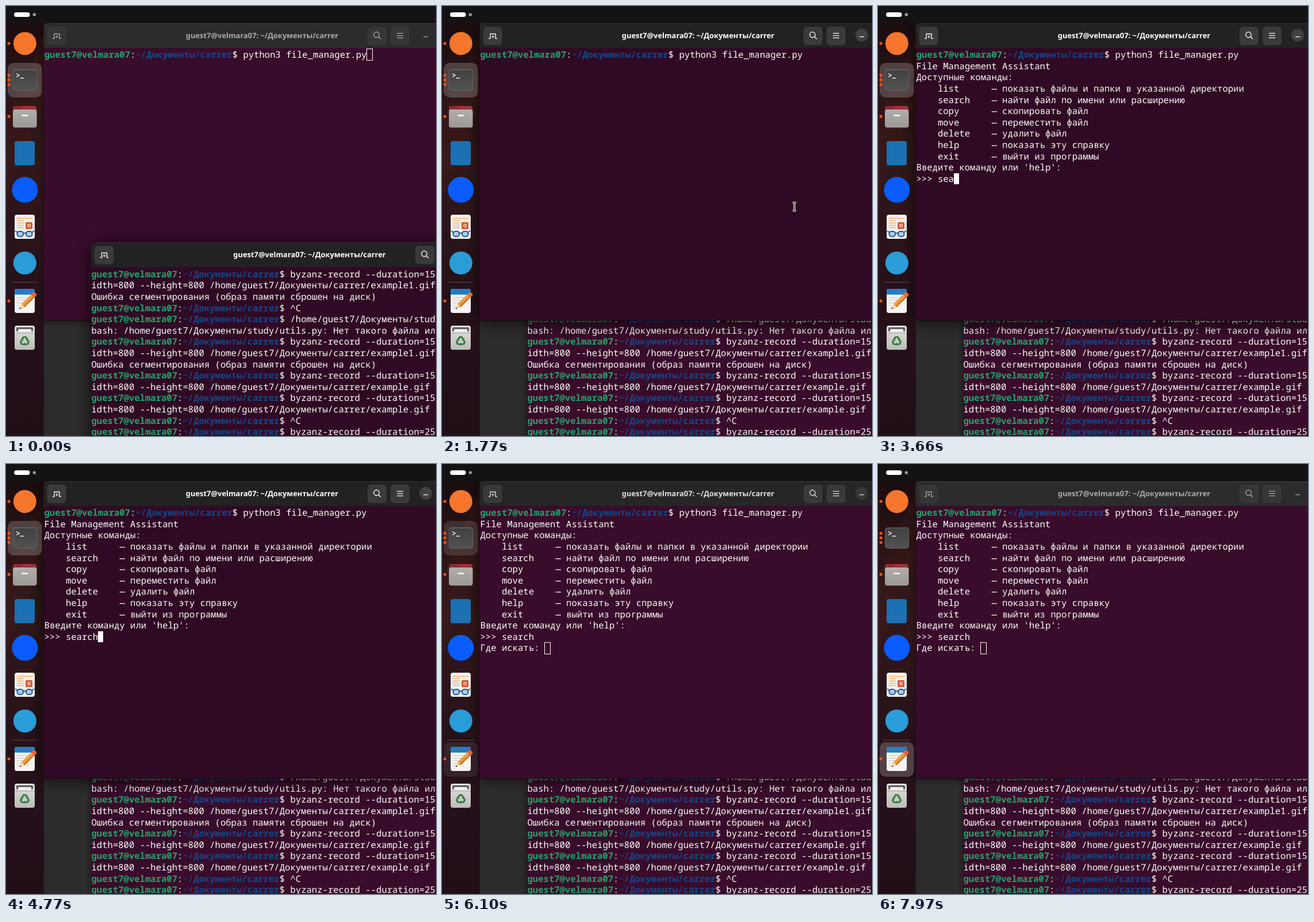
Animation, 748 px wide and 748 px high, one loop 8000 ms. Source, as an HTML page with a canvas:

```html
<!DOCTYPE html>
<html lang="ru">
<head>
<meta charset="utf-8">
<title>Terminal session</title>
<style>
html, body { margin: 0; width: 100%; height: 100%; overflow: hidden; background: #2b2b2b; }
canvas { display: block; width: 748px; height: 748px; }
</style>
</head>
<body>
<canvas id="stage" width="748" height="748"></canvas>
<script>
const ctx = document.getElementById('stage').getContext('2d');
const LOOP = 8000, SIZE = 748, CELL = 9.35, ROW = 19.6;
const MONO = '15.58px "Noto Sans Mono", monospace';
const USER = 'guest7', HOST = 'velmara07';
const FOLDER = '~/Документы/carrer';
const TITLE = `${USER}@${HOST}: ${FOLDER}`;
const PROMPT_LEN = `${USER}@${HOST}:${FOLDER}$ `.length;

// Timeline, in ms
const RAISE = 1060, RUN = 2210, OUTPUT = 2230, ENTER = 4960, BLUR = 6100;
const KEYS = [3410, 3510, 3660, 4220, 4370, 4720];
const BLINK_OFF = [[1670, RUN], [2910, 3410], [5560, BLUR]];
const WIGGLES = [1640, 4640, 7600];
const POINTER = [
  [460, 679.5, 677], [760, 674, 648], [810, 650, 540], [860, 626, 415], [910, 613, 349], [RUN],
  [2360, 640, 349], [2410, 678, 348], [2460, 705, 349],
  [2510, 715, 347], [2560, 728, 353], [2610, 737, 363], [3410],
  [5460, 710, 345], [5510, 722, 337], [5560, 728, 331], [5600]
];

const HELP = [
  'File Management Assistant',
  'Доступные команды:',
  ...[
    ['list', 'показать файлы и папки в указанной директории'],
    ['search', 'найти файл по имени или расширению'],
    ['copy', 'скопировать файл'],
    ['move', 'переместить файл'],
    ['delete', 'удалить файл'],
    ['help', 'показать эту справку'],
    ['exit', 'выйти из программы']
  ].map(([name, about]) => `    ${name.padEnd(10)}— ${about}`),
  "Введите команду или 'help':"
];

const HOME = `/home/${USER}/Документы`;
const record = seconds => '$byzanz-record --duration=' + seconds;
const target = file => `idth=800 --height=800 ${HOME}/carrer/${file}`;
const CRASH = 'Ошибка сегментирования (образ памяти сброшен на диск)';
// Lines starting with $ follow a shell prompt
const HISTORY = [
  record(15), target('example1.gif'), CRASH, '$^C', `$${HOME}/stud`,
  `bash: ${HOME}/study/utils.py: Нет такого файла ил`,
  record(15), target('example1.gif'), CRASH,
  record(15), target('example.gif'),
  record(15), target('example.gif'), '$^C', record(25)
];

const clamp = v => Math.max(0, Math.min(1, v));
const easeOut = v => 1 - (1 - clamp(v)) ** 2;
const mix = (a, b, p) => `rgb(${a.map((v, i) => Math.round(v + (b[i] - v) * p))})`;

function box(x, y, w, h, r, fill) {
  ctx.beginPath();
  ctx.roundRect(x, y, w, h, r);
  ctx.fillStyle = fill;
  ctx.fill();
}

function disc(x, y, r, fill) {
  ctx.beginPath();
  ctx.arc(x, y, r, 0, Math.PI * 2);
  ctx.fillStyle = fill;
  ctx.fill();
}

function line(points, color, width = 1) {
  ctx.beginPath();
  points.forEach(([x, y]) => ctx.lineTo(x, y));
  ctx.strokeStyle = color;
  ctx.lineWidth = width;
  ctx.stroke();
}

function vertical(y0, y1, ...colors) {
  const g = ctx.createLinearGradient(0, y0, 0, y1);
  colors.forEach((c, i) => g.addColorStop(i / (colors.length - 1), c));
  return g;
}

// Places each word on the terminal's character grid
function mono(text, x, y, column = 0, color = '#fff', bold = false) {
  ctx.font = (bold ? 'bold ' : '') + MONO;
  ctx.fillStyle = color;
  ctx.textAlign = 'left';
  for (const word of text.matchAll(/\S+/g))
    ctx.fillText(word[0], x + (column + word.index) * CELL, y);
}

function shellLine(command, x, y) {
  const who = `${USER}@${HOST}`;
  mono(who, x, y, 0, '#26a269', true);
  mono(':', x, y, who.length);
  mono(FOLDER, x, y, who.length + 1, '#12488b', true);
  mono('$ ' + command, x, y, PROMPT_LEN - 2);
}

function headerButton(x, y, p) {
  box(x, y, 33, 32, 6, mix([54, 54, 54], [58, 58, 58], p));
}

function header(x, y, titleX, searchX, p) {
  const ink = mix([170, 170, 170], [255, 255, 255], p);
  box(x, y, SIZE, 43, [12, 0, 0, 0], mix([44, 44, 44], [34, 34, 34], p));
  ctx.beginPath();
  ctx.arc(x + 12, y + 12, 11.5, Math.PI, Math.PI * 1.5);
  ctx.lineTo(SIZE, y + 0.5);
  ctx.strokeStyle = 'rgba(255,255,255,.09)';
  ctx.lineWidth = 1;
  ctx.stroke();

  headerButton(x + 6, y + 6, p);
  const tx = x + 22.5, ty = y + 18.5;
  line([[tx - 7, ty + 8], [tx - 4, ty + 8], [tx - 4, ty], [tx + 5, ty], [tx + 5, ty + 8], [tx + 8, ty + 8]], ink, 1.3);
  line([[tx - 2, ty + 5], [tx + 3, ty + 5]], ink);
  line([[tx + 0.5, ty + 2.5], [tx + 0.5, ty + 7.5]], ink);

  ctx.font = 'bold 12.9px "Noto Sans", sans-serif';
  ctx.textAlign = 'center';
  ctx.fillStyle = ink;
  ctx.fillText(TITLE, titleX, y + 26);

  headerButton(searchX, y + 6, p);
  ctx.beginPath();
  ctx.arc(searchX + 15.5, y + 20, 4.7, 0, Math.PI * 2);
  ctx.strokeStyle = ink;
  ctx.lineWidth = 1.4;
  ctx.stroke();
  line([[searchX + 19, y + 23.5], [searchX + 23, y + 27.5]], ink, 1.5);

  headerButton(searchX + 40, y + 6, p);
  for (const dy of [17.5, 21.5, 25.5])
    line([[searchX + 51, y + dy], [searchX + 62, y + dy]], ink, 1.2);
  disc(searchX + 101, y + 21, 11, `rgba(64,64,64,${p})`);
  line([[searchX + 97, y + 23.5], [searchX + 105, y + 23.5]], ink, 1.3);
}

function windowFrame(x, y, height, active, p) {
  ctx.save();
  ctx.shadowColor = `rgba(0,0,0,${0.5 + 0.25 * p})`;
  ctx.shadowBlur = 12 + 16 * p;
  ctx.shadowOffsetY = 3;
  box(x, y, SIZE, height, [12, 0, 0, 0], active ? '#300a24' : '#380c2a');
  ctx.restore();
}

function recorder(active) {
  const p = active ? 1 : 0;
  windowFrame(148, 411, 400, active, p);
  header(148, 411, 528, 712, p);
  HISTORY.forEach((text, i) => {
    const y = 471.8 + i * ROW;
    if (text[0] === '$') shellLine(text.slice(1), 148.5, y);
    else mono(text, 148.5, y);
  });
}

function cursor(t, column, row, active) {
  const x = 66.5 + column * CELL, y = 75.4 + row * ROW;
  if (!active) {
    ctx.strokeStyle = '#fff';
    ctx.lineWidth = 1;
    ctx.strokeRect(Math.round(x) - 0.5, Math.round(y) - 0.5, 10, 20);
  } else if (!BLINK_OFF.some(([from, to]) => t >= from && t < to)) {
    ctx.fillStyle = '#fff';
    ctx.fillRect(Math.round(x), Math.round(y), 9, 19);
  }
}

function manager(t, active, p) {
  const left = 66.5, baseline = row => 90.2 + row * ROW;
  windowFrame(65.5, 30, 517, active, p);
  header(65.5, 30, 445.5, 629, p);
  line([[66, 547], [SIZE, 547]], 'rgba(0,0,0,.55)');

  const command = 'python3 file_manager.py';
  shellLine(command, left, baseline(0));
  if (t < OUTPUT) return cursor(t, PROMPT_LEN + command.length, 0, active);

  HELP.forEach((text, i) => mono(text, left, baseline(i + 1)));
  const typed = 'search'.slice(0, KEYS.filter(k => t >= k).length);
  mono('>>> ' + typed, left, baseline(11));
  if (t < ENTER) return cursor(t, 4 + typed.length, 11, active);

  const question = 'Где искать: ';
  mono(question, left, baseline(12));
  cursor(t, question.length, 12, active);
}

function documentIcon() {
  box(15, 363, 35, 42, 4, '#f4f2ef');
  for (let i = 0; i < 5; i++)
    line([[19, 369.5 + i * 4], [i ? 31 : 46, 369.5 + i * 4]], '#e8b265', 1.5);
  box(34, 376, 12, 12, 1.5, '#e2582f');
  disc(40, 382, 3, '#f7d3c4');
  disc(40, 382, 1.6, '#e2582f');
  ctx.strokeStyle = '#235a94';
  ctx.lineWidth = 2;
  for (const x of [19.5, 35]) {
    ctx.beginPath();
    ctx.roundRect(x, 392, 10.5, 9, 4);
    ctx.fillStyle = '#a9cdec';
    ctx.fill();
    ctx.stroke();
  }
  line([[16, 391], [20, 394]], '#235a94', 2);
  line([[30, 395], [35, 395]], '#235a94', 2);
  line([[45, 394], [49, 391]], '#235a94', 2);
}

function editorIcon() {
  box(15, 492, 35, 42, 4, '#f5f4f2');
  box(15, 492, 35, 10, [4, 4, 0, 0], '#1f7fc4');
  for (let i = 0; i < 5; i++)
    line([[19, 507.5 + i * 4.5], [i < 3 ? 44 - i * 6 : 25, 507.5 + i * 4.5]], '#c9c8c5', 1.2);
  ctx.save();
  ctx.translate(24, 527);
  ctx.rotate(-Math.PI / 4);
  box(8, -4, 26, 8, 0, '#eda045');
  box(8, 1, 26, 3, 0, '#cf7b2b');
  box(32, -4, 7, 8, [0, 3, 3, 0], '#e8623a');
  ctx.beginPath();
  ctx.moveTo(0, 0);
  ctx.lineTo(8, -4);
  ctx.lineTo(8, 4);
  ctx.fillStyle = '#f3d2a2';
  ctx.fill();
  disc(1.5, 0, 1.3, '#4a3a32');
  ctx.restore();
}

function binIcon() {
  box(15, 556, 35, 42, 4, vertical(556, 598, '#e2e1df', '#cfcecb', '#bdbcb9'));
  box(18, 559, 29, 7, 2, '#5b5b5b');
  box(21, 562, 23, 5, 1, '#f1f0ee');
  line([[15, 569], [50, 569]], '#a9a8a5');
  for (let i = 0; i < 3; i++) {
    ctx.save();
    ctx.translate(32.5, 583);
    ctx.rotate(i * Math.PI * 2 / 3);
    line([[-4.5, -3], [-2, -7], [2, -7], [4, -4]], '#2c7a3a', 2.8);
    ctx.beginPath();
    ctx.moveTo(6.7, -5);
    ctx.lineTo(5.5, -0.5);
    ctx.lineTo(1.3, -2.5);
    ctx.fillStyle = '#2c7a3a';
    ctx.fill();
    ctx.restore();
  }
}

function dockBackground() {
  ctx.fillStyle = vertical(30, SIZE, '#1b0d10', '#2b1416', '#33181a', '#2b141a', '#271119', '#23101a', '#210f18');
  ctx.fillRect(0, 30, 66, SIZE);
  ctx.beginPath();
  ctx.moveTo(0, 330);
  ctx.lineTo(66, 165);
  ctx.lineTo(66, 45);
  ctx.lineTo(0, 200);
  ctx.fillStyle = 'rgba(90,36,28,.16)';
  ctx.fill();
}

function dock(t, away) {
  const glow = a => `rgba(255,255,255,${0.2 * a})`;
  box(3, 99, 59.5, 60, 10, glow(1 - away));
  box(3, 484, 59.5, 60, 10, glow(away));
  for (const y of [65, 120.5, 128.5, 136.5, 192, 513]) disc(5, y, 2.6, '#e95420');

  // Urgent-app wiggle: two swings of 15 degrees in half a second
  const start = WIGGLES.find(s => t >= s && t < s + 500);
  const swing = start === undefined ? 0 : 15 * Math.sin((t - start) / 500 * 4 * Math.PI);
  ctx.save();
  ctx.translate(32.5, 64.5);
  ctx.rotate(swing * Math.PI / 180);
  disc(0.3, 0.7, 20, '#f5762c');
  ctx.restore();

  box(12, 110.5, 42, 36.5, 5, '#777');
  box(12.5, 111.5, 41, 35, 4.5, vertical(111, 147, '#414141', '#535353'));
  line([[18, 117.5], [23, 120.5], [18, 123.5]], '#fff', 1.4);
  line([[24.5, 125.5], [31, 125.5]], '#fff', 1.4);

  box(12, 174, 41, 25, 4, vertical(174, 199, '#a5333a', '#6b2230'));
  box(12, 174, 17, 5, [4, 4, 0, 0], '#8b2834');
  box(12, 180, 41.5, 31.5, 4, vertical(180, 212, '#b0aeab', '#9b9996'));
  line([[27.5, 190.5], [38, 190.5]], '#fff', 2.4);

  box(15, 235, 35, 42, 4, '#1c70b4');
  disc(32.8, 319.8, 22.5, '#0b5cff');
  documentIcon();
  disc(32.8, 447, 20, '#2a9cd8');
  line([[10, 480.5], [55, 480.5]], '#56474c');
  editorIcon();
  binIcon();
}

function topBar() {
  ctx.fillStyle = '#131313';
  ctx.fillRect(0, 0, SIZE, 30);
  box(14, 11, 27.5, 8, 4, '#fff');
  disc(49.3, 15, 2.7, '#9a9a9a');
}

function pointer(t) {
  const spot = POINTER.filter(([at]) => t >= at).pop();
  if (!spot || spot.length < 3) return;
  const [, x, y] = spot;
  for (const [color, width] of [['#fff', 3.2], ['#222', 1.2]]) {
    const h = width > 2 ? 0 : 0.2;
    line([[x - 3 + h, y - 7], [x + 3 - h, y - 7]], color, width);
    line([[x - 3 + h, y + 7], [x + 3 - h, y + 7]], color, width);
    line([[x, y - 7], [x, y + 7]], color, width);
  }
}

function draw(t) {
  ctx.textRendering = 'geometricPrecision';
  const raised = t >= RAISE, active = raised && t < BLUR;
  const away = easeOut((t - BLUR + 50) / 250);
  const focus = raised ? easeOut((t - RAISE + 50) / 200) * (1 - away) : 0;

  ctx.fillStyle = '#2c2c2c';
  ctx.fillRect(0, 0, SIZE, SIZE);
  dockBackground();
  if (raised) {
    recorder(false);
    manager(t, active, focus);
  } else {
    manager(t, false, 0);
    recorder(true);
  }
  dock(t, away);
  topBar();
  pointer(t);
}

const begin = performance.now();
function tick() {
  draw((performance.now() - begin) % LOOP);
  requestAnimationFrame(tick);
}
tick();
</script>
</body>
</html>
```
